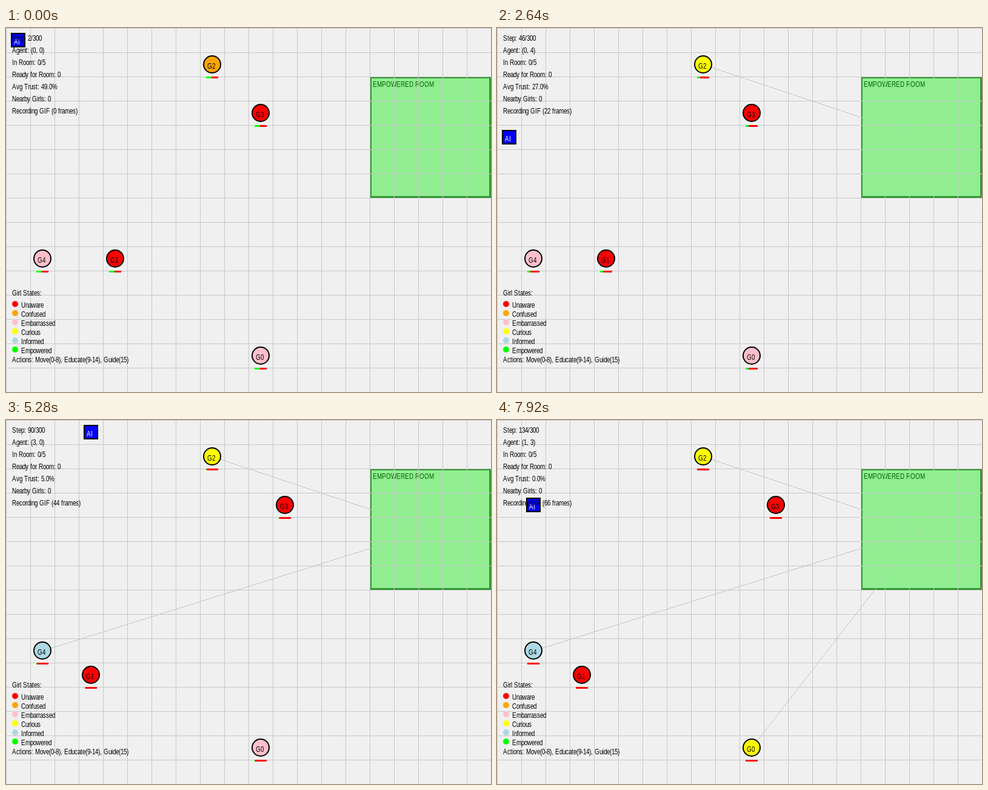
An HTML page with a canvas that plays this animation: 800 px wide and 600 px high, repeating every 8000 ms.

```html
<!DOCTYPE html>
<html lang="en">
<head>
<meta charset="utf-8">
<title>Grid agent</title>
<style>
  html, body { margin: 0; width: 100%; height: 100%; overflow: hidden; background: #f0f0f0; }
  canvas { display: block; }
</style>
</head>
<body>
<canvas id="stage" width="800" height="600"></canvas>
<script>
const ctx = document.getElementById('stage').getContext('2d');
const LOOP = 8000, TICK = 120, CELL = 40;
const NARROW = 0.82; // advance ratio of the narrow sans face
const GOAL = [700, 180];
const ROOM = { x: 600, y: 80, size: 200 };

const STATES = {
  Unaware: '#ff0000', Confused: '#ffa500', Embarrassed: '#ffc0cb',
  Curious: '#ffff00', Informed: '#add8e6', Empowered: '#00ff00'
};

// Each step is [tick, value...] and holds until the next one.
const AGENT = [
  [0, 0, 0], [9, 0, 1], [16, 0, 2], [19, 0, 3], [22, 0, 4], [26, 0, 3],
  [28, 1, 3], [30, 2, 3], [32, 3, 2], [34, 4, 2], [38, 4, 1], [41, 3, 1],
  [44, 3, 0], [48, 3, 1], [50, 2, 2], [53, 2, 3], [55, 2, 4], [58, 1, 4],
  [60, 0, 4], [62, 0, 3], [65, 1, 3]
];
const GIRLS = [
  { at: [[0, 10, 13]], state: [[0, 'Embarrassed'], [65, 'Curious']] },
  { at: [[0, 4, 9], [28, 3, 10]], state: [[0, 'Unaware']] },
  { at: [[0, 8, 1]], state: [[0, 'Confused'], [4, 'Curious']] },
  { at: [[0, 10, 3], [25, 11, 3]], state: [[0, 'Unaware']] },
  { at: [[0, 1, 9]], state: [[0, 'Embarrassed'], [39, 'Informed']] }
];

const valueAt = (steps, tick) => steps.filter(s => s[0] <= tick).pop().slice(1);
const center = cell => cell * CELL + CELL / 2;

function rect(color, x, y, w, h) {
  ctx.fillStyle = color;
  ctx.fillRect(x, y, w, h);
}

function disc(color, x, y, r) {
  ctx.fillStyle = color;
  ctx.beginPath();
  ctx.arc(x, y, r, 0, Math.PI * 2);
  ctx.fill();
}

// Letters sit on whole pixels, as with hinted screen text.
function text(str, x, baseline, color = '#000') {
  ctx.fillStyle = color;
  ctx.font = '12px "Liberation Sans", Arial, sans-serif';
  for (const ch of str) {
    ctx.setTransform(NARROW, 0, 0, 1, x, baseline);
    ctx.fillText(ch, 0, 0);
    x += Math.round(ctx.measureText(ch).width * NARROW);
  }
  ctx.resetTransform();
}

function drawBoard() {
  const { x, y, size } = ROOM;
  rect('#f0f0f0', 0, 0, 800, 600);
  rect('#329632', x, y, size, size);
  rect('#90ee90', x + 3, y + 3, size - 6, size - 6);
  text('EMPOWERED ROOM', x + 5, 97, '#006400');
  for (let p = 0; p < 800; p += CELL) {
    rect('#c8c8c8', p, 0, 1, 600);
    if (p < 600) rect('#c8c8c8', 0, p, 800, 1);
  }
}

// One-pixel line without smoothing; fainter inside the room.
function drawGuide(x, y) {
  const dx = GOAL[0] - x, dy = GOAL[1] - y;
  const n = Math.max(Math.abs(dx), Math.abs(dy));
  for (let i = 0; i <= n; i++) {
    const px = Math.round(x + dx * i / n), py = Math.round(y + dy * i / n);
    const inside = px > ROOM.x && py < ROOM.y + ROOM.size;
    rect(inside ? '#a8dca8' : '#c4c4c4', px, py, 1, 1);
  }
}

function drawGirl(girl, index, tick, trust) {
  const [x, y] = valueAt(girl.at, tick).map(center);
  const [state] = valueAt(girl.state, tick);
  if (state === 'Curious' || state === 'Informed') drawGuide(x, y);
  disc('#000', x, y, 15);
  disc(STATES[state], x, y, 13);
  text('G' + index, x - 8, y + 7);
  rect('#ff0000', x - 10, y + 20, 20, 3);
  rect('#00ff00', x - 10, y + 20, Math.floor(trust / 5), 3);
}

function drawAgent(col, row) {
  const x = center(col), y = center(row);
  rect('#000', x - 12, y - 12, 24, 24);
  rect('#0000ff', x - 10, y - 10, 20, 20);
  text('AI', x - 7, y + 7, '#fff');
}

function drawPanel(tick, trust, col, row) {
  [
    `Step: ${2 + 2 * tick}/300`,
    `Agent: (${col}, ${row})`,
    'In Room: 0/5',
    'Ready for Room: 0',
    `Avg Trust: ${trust.toFixed(1)}%`,
    'Nearby Girls: 0',
    `Recording GIF (${tick} frames)`
  ].forEach((line, i) => text(line, 10, 21 + 20 * i));

  text('Girl States:', 10, 441);
  Object.entries(STATES).forEach(([name, color], i) => {
    disc(color, 15, 455 + 15 * i, 5);
    text(name, 25, 461 + 15 * i);
  });
  text('Actions: Move(0-8), Educate(9-14), Guide(15)', 10, 551);
}

function draw(tick) {
  const trust = Math.max(0, 49 - tick);
  const [col, row] = valueAt(AGENT, tick);
  drawBoard();
  GIRLS.forEach((girl, i) => drawGirl(girl, i, tick, trust));
  drawAgent(col, row);
  drawPanel(tick, trust, col, row);
}

let shown = -1;
function play(now) {
  const tick = Math.floor((now % LOOP) / TICK);
  if (tick !== shown) draw(shown = tick);
  requestAnimationFrame(play);
}
draw(0);
requestAnimationFrame(play);
</script>
</body>
</html>
```
